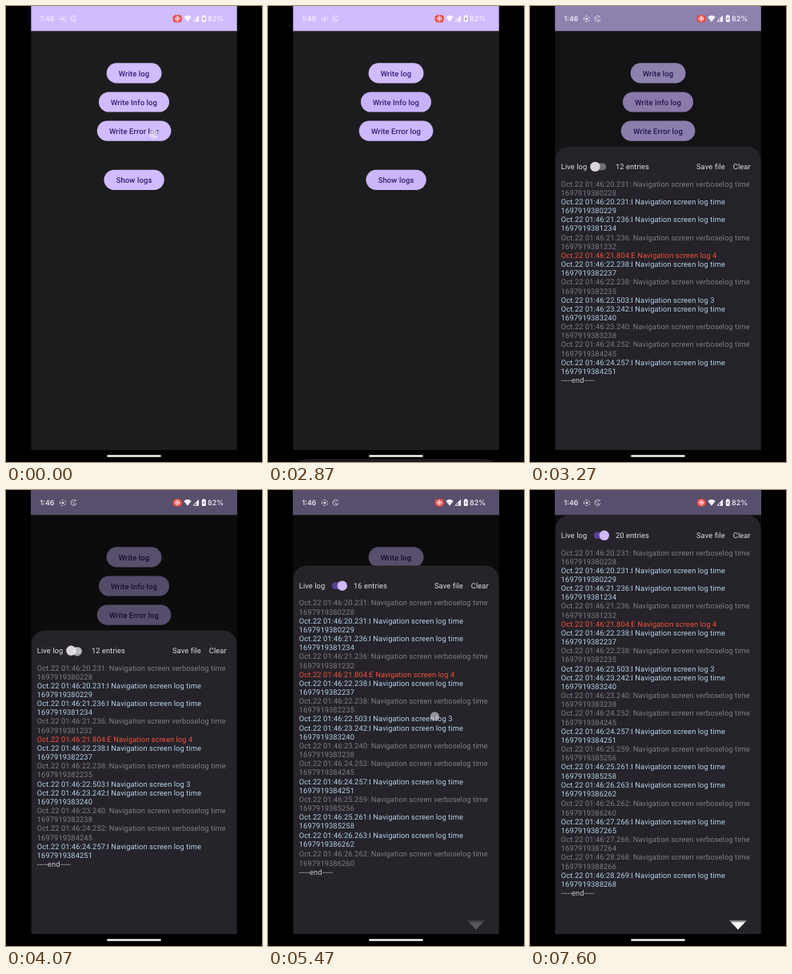
An HTML page with a canvas for the animation above (8000 ms loop, 320x570 px).

```html
<!DOCTYPE html>
<html lang="en">
<head>
<meta charset="utf-8">
<title>Log viewer</title>
<style>
html, body { margin: 0; width: 100%; height: 100%; overflow: hidden; background: #000; }
canvas { display: block; width: 320px; height: 570px; }
</style>
</head>
<body>
<canvas id="stage"></canvas>
<script>
const LOOP = 8000, LEFT = 31.4, RIGHT = 288.7, BOTTOM = 555, ROW = 11.16;
const canvas = document.getElementById('stage');
const ctx = canvas.getContext('2d');
const dpr = window.devicePixelRatio || 1;
canvas.width = 320 * dpr;
canvas.height = 570 * dpr;
ctx.textRendering = 'geometricPrecision';

const buttons = [
  { label: 'Write log', x: 125.7, y: 71.3, w: 68.8 },
  { label: 'Write Info log', x: 116, y: 107.4, w: 88 },
  { label: 'Write Error log', x: 113.8, y: 143.5, w: 92.6 },
  { label: 'Show logs', x: 122.5, y: 204.7, w: 75.3 }
];

// Taps on buttons: button index, start, end of the ripple, lasting tint
const taps = [[2, 70, 530, 0.025], [1, 930, 1730, 0.05], [3, 2000, 2130, 0.04]];

// Finger marks: start, end, from, to
const touches = [
  [-100, 200, 185, 160, 185, 160],
  [870, 1130, 184, 124, 184, 124],
  [2000, 2130, 188, 217, 188, 217],
  [4070, 4270, 89, 202, 89, 202],
  [5270, 5530, 195, 324, 212, 272]
];

// kind, seconds, end of the timestamp or message number
const logs = `V 20.231 0228,I 20.231 0229,I 21.236 1234,V 21.236 1232,E 21.804 4,
I 22.238 2237,V 22.238 2235,I 22.503 3,I 23.242 3240,V 23.240 3238,V 24.252 4245,
I 24.257 4251,V 25.259 5256,I 25.261 5258,I 26.263 6262,V 26.262 6260,I 27.266 7265,
V 27.266 7264,V 28.268 8266,I 28.269 8268`.split(',').map(line => {
  const [kind, seconds, tail] = line.trim().split(' ');
  const head = `Oct.22 01:46:${seconds}:${kind === 'V' ? '' : kind} Navigation screen `;
  const color = { V: '#807d83', I: '#b2d2e8', E: '#ee5238' }[kind];
  const rows = tail.length === 1
    ? [head + 'log ' + tail]
    : [head + (kind === 'V' ? 'verboselog time' : 'log time'), '169791938' + tail];
  return { rows, color };
});

const counts = [[0, 12], [4330, 14], [5130, 16], [6000, 18], [7400, 20]];
const listed = [[0, 12], [4330, 14], [5270, 16], [6530, 18], [7530, 20]];

const progress = (t, a, b) => Math.min(1, Math.max(0, (t - a) / (b - a)));
const smooth = p => p * p * (3 - 2 * p);
const stepValue = (steps, t) => steps.filter(s => t >= s[0]).pop()[1];

function text(str, x, y, color, font = '9.35px Roboto, sans-serif', spacing = 0.07, align = 'left') {
  ctx.font = font;
  ctx.letterSpacing = spacing + 'px';
  ctx.textAlign = align;
  ctx.fillStyle = color;
  ctx.fillText(str, x, y);
}

function pill(x, y, w, h, r, color) {
  ctx.beginPath();
  ctx.roundRect(x, y, w, h, r);
  ctx.fillStyle = color;
  ctx.fill();
}

function disc(x, y, r, color) {
  ctx.beginPath();
  ctx.arc(x, y, r, 0, 7);
  ctx.fillStyle = color;
  ctx.fill();
}

function shape(d, color, stroke) {
  const path = new Path2D(d);
  if (stroke) {
    ctx.strokeStyle = color;
    ctx.lineWidth = stroke;
    ctx.stroke(path);
  } else {
    ctx.fillStyle = color;
    ctx.fill(path);
  }
}

function drawScreen(t) {
  ctx.fillStyle = '#1c1c1e';
  ctx.fillRect(LEFT, 0, RIGHT - LEFT, BOTTOM);
  ctx.fillStyle = '#d0bcff';
  ctx.fillRect(LEFT, 0, RIGHT - LEFT, 31.25);
  buttons.forEach((b, i) => {
    pill(b.x, b.y, b.w, 25.2, 12.6, '#d0bcff');
    for (const [index, start, end, rest] of taps) {
      if (index !== i || t < start) continue;
      const rise = progress(t, start, start + 130);
      const fade = progress(t, start + 130, end);
      const alpha = rise * (0.1 + (rest - 0.1) * fade);
      pill(b.x, b.y, b.w, 25.2, 12.6, `rgba(56,30,114,${alpha})`);
    }
    text(b.label, 160, b.y + 16.2, '#381e72', '500 9.56px Roboto, sans-serif', 0.06, 'center');
  });
}

function drawStatus() {
  const white = '#f8f4ff', soft = 'rgba(255,255,255,.8)';
  text('1:46', 42.6, 19.2, white, '500 8.9px Inter, sans-serif', 0);
  text('82%', 252, 19.2, white, '500 9px Inter, sans-serif', 0);
  disc(71, 16, 1.5, soft);
  ctx.setLineDash([2.6, 1.4]);
  shape('M67.4 16a3.6 3.6 0 1 1 7.2 0a3.6 3.6 0 1 1 -7.2 0', soft, 0.9);
  ctx.setLineDash([]);
  shape('M86.5 12.8A3.5 3.5 0 1 0 88 16.5M82.8 14.4L86.4 18.2M85.5 14.5L88 12.5', soft, 0.9);
  pill(208.6, 11.2, 11.2, 9.2, 4, '#ec463e');
  shape('M211.4 15.8a2.8 2.8 0 1 1 5.6 0a2.8 2.8 0 1 1 -5.6 0', white, 0.7);
  shape('M214.2 12V19.6M210.4 15.8H218', white, 0.7);
  disc(214.2, 15.8, 1.2, white);
  shape('M222.3 13.8Q227 9.9 231.7 13.8L227 19.8Z', white);
  shape('M234 19.2L240.6 12.4V19.2Z', white, 0.9);
  shape('M237.8 15.4L241 12V19.6H237.8Z', white);
  pill(244.8, 12, 5, 8, 1, white);
  pill(246.2, 11, 2.2, 1.4, 0.4, white);
  shape('M247.8 13.6L246 16.4H247.2L246.8 18.6L248.6 15.6H247.4Z', '#6d5c8c');
}

function drawSwitch(t, y) {
  const on = smooth(progress(t, 4200, 4330));
  const halo = 0.14 * progress(t, 4130, 4270) * (1 - progress(t, 4800, 4930));
  const x = 81.4 + 11.4 * on;
  pill(78 + 1.6 * on, y - 4.3, 17.2 - 1.6 * on, 8.6, 4.3, on > 0.5 ? '#573f93' : '#716f75');
  disc(x, y, 10, `rgba(208,188,255,${halo})`);
  disc(x, y, 6.2, on > 0.5 ? '#d0b8fb' : '#dbd7dd');
}

function drawArrow(t) {
  const gradient = ctx.createLinearGradient(0, 537, 0, 541.5);
  gradient.addColorStop(0, 'rgba(255,255,255,.1)');
  gradient.addColorStop(1, '#fff');
  ctx.globalAlpha = progress(t, 5430, 5600);
  shape('M248.5 537.5H271.5L260 549.5Z', gradient);
  ctx.globalAlpha = 1;
}

function drawSheet(t) {
  if (t < 2870) return;
  const enter = 394 * (1 - progress(t, 2870, 3330)) ** 4;
  const top = 176 + enter - 144 * smooth(progress(t, 5330, 5590));
  const floor = t < 3270 ? 570 : BOTTOM;
  ctx.save();
  ctx.beginPath();
  ctx.rect(LEFT, 0, RIGHT - LEFT, floor);
  ctx.clip();
  ctx.globalAlpha = 0.8 + 0.2 * progress(t, 2970, 3300);
  pill(LEFT, top - 0.4, RIGHT - LEFT, 620, 17.5, '#26232a');

  const titleY = top + 28.2, titleColor = '#e2dde5';
  text('Live log', 38.8, titleY, titleColor);
  text(stepValue(counts, t) + ' entries', 107, titleY, titleColor);
  text('Save file', 208, titleY, titleColor);
  text('Clear', 253.8, titleY, titleColor);
  drawSwitch(t, top + 24.8);

  let y = top + 49.5;
  logs.slice(0, stepValue(listed, t)).forEach((entry, i) => {
    if (i === 15) y += 1.5;
    for (const row of entry.rows) {
      text(row, 38.8, y, entry.color);
      y += ROW;
    }
  });
  text('-----end-----', 38.8, y, '#c9c5cc');
  drawArrow(t);
  ctx.restore();
}

function drawTouches(t) {
  for (const [start, end, x1, y1, x2, y2] of touches) {
    if (t < start || t >= end) continue;
    const p = smooth(progress(t, start + 60, end));
    const alpha = 0.62 * (1 - progress(t, end - 70, end + 40));
    disc(x1 + (x2 - x1) * p, y1 + (y2 - y1) * p, 5.7, `rgba(236,236,244,${alpha})`);
  }
}

function draw() {
  const t = performance.now() % LOOP;
  ctx.setTransform(dpr, 0, 0, dpr, 0, 0);
  ctx.fillStyle = '#000';
  ctx.fillRect(0, 0, 320, 570);
  drawScreen(t);
  ctx.fillStyle = `rgba(0,0,0,${0.58 * progress(t, 2870, 3600)})`;
  ctx.fillRect(LEFT, 0, RIGHT - LEFT, BOTTOM);
  drawSheet(t);
  drawStatus();
  pill(126.2, 561.2, 67.6, 2.6, 1.3, '#f4f4f4');
  drawTouches(t);
  requestAnimationFrame(draw);
}
draw();
</script>
</body>
</html>
```
